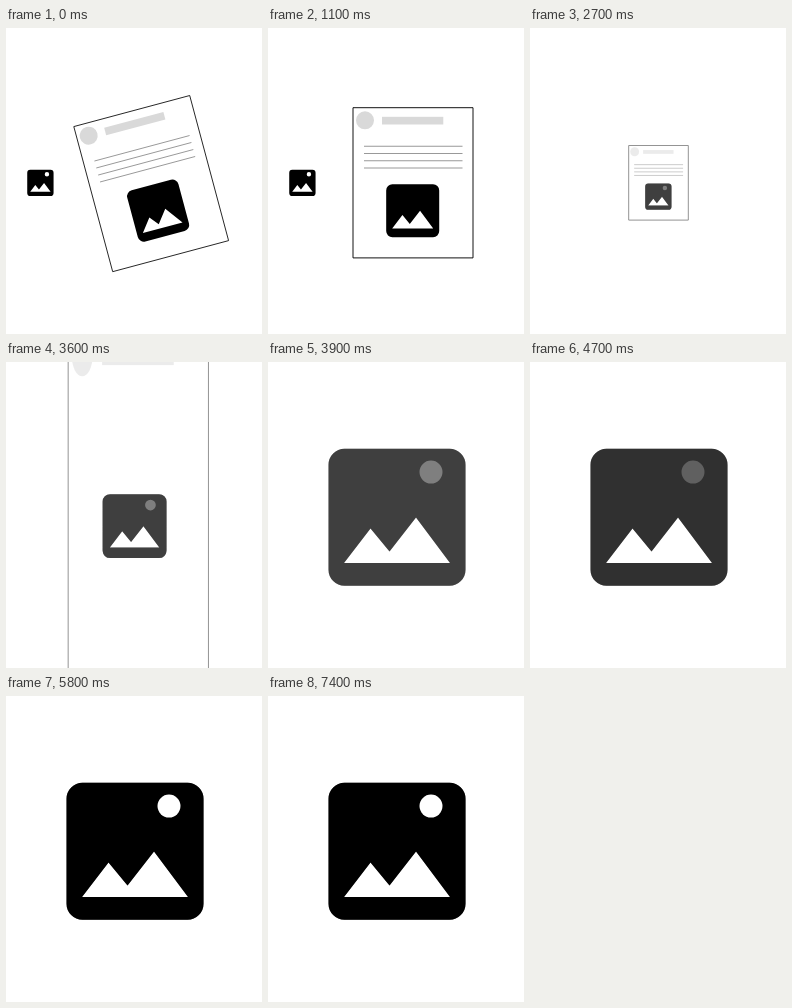
An HTML page for the animation above (8000 ms loop, 256 by 306 pixels).

```html
<!DOCTYPE html>
<html lang="en">
<head>
<meta charset="utf-8">
<title>Image registration</title>
<style>
  html, body { margin: 0; width: 100%; height: 100%; overflow: hidden; background: #fff; }
  svg { display: block; width: 256px; height: 306px; }
  .edge { fill: none; stroke: #000; stroke-width: .85px; vector-effect: non-scaling-stroke; }
  .grey { fill: #d9d9d9; }
  #lines { stroke: #999; fill: none; vector-effect: non-scaling-stroke; }
</style>
</head>
<body>
<svg viewBox="0 0 256 306">
  <g id="page">
    <rect class="edge" x="-60" y="-75.1" width="120" height="150.2"/>
    <circle class="grey" cx="-48" cy="-62.5" r="9"/>
    <rect class="grey" x="-31" y="-66" width="61.3" height="7.7"/>
    <path id="lines" d="M-49-36.5h98.5M-49-29.3h98.5M-49-22h98.5M-49-14.8h98.5"/>
  </g>
  <path id="found" fill-rule="evenodd"/>
  <path id="template" fill-rule="evenodd"/>
  <circle id="sun" cx="163" cy="110.1" r="11.5" fill="#fff"/>
</svg>
<script>
const [page, lines, found, template, sun] =
  ['page', 'lines', 'found', 'template', 'sun'].map(id => document.getElementById(id));

const LOOP = 8000, TICK = 100;
// Eased progress on each tick of a long and a short move
const LONG = [0.34, 0.9, 0.98, 1];
const SHORT = [0.25, 0.81, 1];

// Both icons are 137 units wide around 0,0; only the template has the sun hole
const body = 'M-52.5-68.5h105a16 16 0 0 1 16 16v105a16 16 0 0 1-16 16h-105' +
  'a16 16 0 0 1-16-16v-105a16 16 0 0 1 16-16z' +
  'M-53 45.7L-26.5 11.2L-7.5 34.2L19 .2L53 45.7z';
found.setAttribute('d', body);
template.setAttribute('d', body + 'M22.5-45.2a11.5 11.5 0 1 0 23 0a11.5 11.5 0 1 0-23 0z');

const mix = (a, b, p) => a + (b - a) * p;
const place = (el, x, y, sx, sy = sx, turn = 0, rest = '') =>
  el.setAttribute('transform', `translate(${x} ${y}) rotate(${turn}) scale(${sx} ${sy}) ${rest}`);

function draw(ms) {
  const progress = (start, steps) => {
    const i = Math.floor((ms - start) / TICK);
    return i < 0 ? 0 : steps[Math.min(i, steps.length - 1)];
  };
  const turn = progress(800, LONG);
  const shrink = progress(1700, LONG);
  const overlay = progress(2500, SHORT);
  const zoom = progress(3600, LONG);
  const darken = progress(4700, SHORT);
  const glow = progress(5500, LONG) - progress(6300, SHORT) + progress(7200, SHORT);

  const angle = mix(-15, 0, turn);
  const x = mix(mix(145.2, 145, turn), 128.5, shrink);
  const y = mix(155.6, 154.8, turn);
  const size = mix(1, 0.4967, shrink);
  const fade = mix(1, 0.5, overlay);

  place(page, mix(x, 139.7, zoom), mix(y, 111.5, zoom),
    mix(size, 2.474, zoom), mix(size, 5.947, zoom), angle);
  page.setAttribute('opacity', fade);
  lines.setAttribute('opacity', zoom > 0 ? 0 : 1);

  const s = mix(size, 2.584, zoom);
  place(found, mix(x, 129.8, zoom), mix(y, 83.2, zoom), s, s, angle,
    'translate(-.3 27.9) scale(.387)');
  found.setAttribute('opacity', mix(fade, 1, darken));

  place(template, mix(mix(34.4, 128.35, overlay), 129, zoom),
    mix(mix(154.9, 168.66, overlay), 155.3, zoom), mix(0.1922, 1, zoom));
  template.setAttribute('opacity', fade);

  sun.setAttribute('opacity', glow);
}

const begin = performance.now();
function loop() {
  draw((performance.now() - begin) % LOOP);
  requestAnimationFrame(loop);
}
loop();
</script>
</body>
</html>
```
